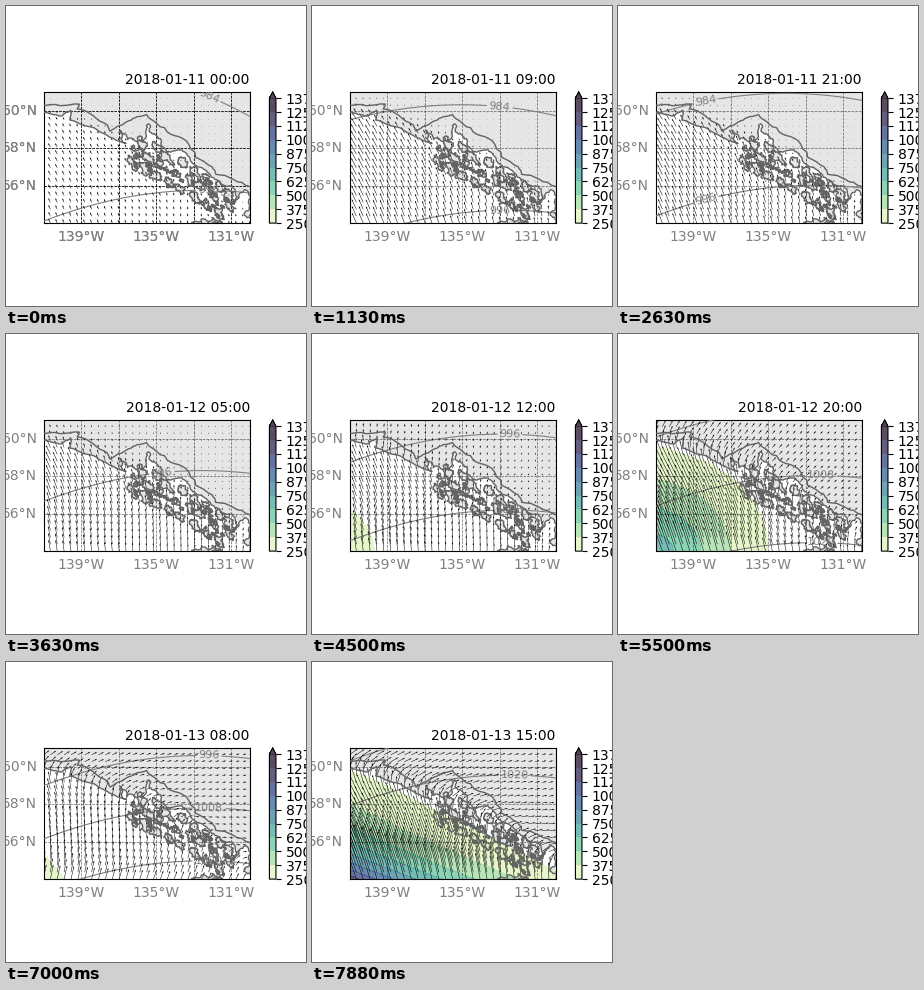
A matplotlib script that plays this animation: 300x300 px, repeating every 8 s.

```python
import numpy as np
import matplotlib.pyplot as plt
from matplotlib.animation import FuncAnimation
from matplotlib.colors import LinearSegmentedColormap

HOURS = 64
W, E, S, N = -141, -130, 54, 61
PX = 18.75                      # pixels per degree
X0, Y0 = 37.5, 85.875           # top left corner of the map in pixels
WIDE, HIGH = PX * (E - W), PX * (N - S)
LEVELS = np.arange(250, 1376, 125)
DEEP = LinearSegmentedColormap.from_list("deep", [
    "#fdfecc", "#c9ebb1", "#91d8a3", "#66c2a3", "#51a8a2", "#4a8da0",
    "#41729c", "#405494", "#413d6b", "#372946", "#281a2c"])
COAST = dict(color="0.39", lw=1, zorder=6)
rng = np.random.default_rng(11)


def lon(x):
    return W + (x - X0) / PX


def lat(y):
    return N - (y - Y0) / PX


def bump(k, mid, width):
    return np.exp(-0.5 * ((k - mid) / width) ** 2)


def ease(k, start, end):
    s = np.clip((k - start) / (end - start), 0, 1)
    return s * s * (3 - 2 * s)


def rough(pts, depth, amp):
    """Break every segment at a displaced midpoint, several times."""
    p = np.array(pts, float)
    for _ in range(depth):
        d = np.diff(p, axis=0)
        side = np.c_[-d[:, 1], d[:, 0]] * rng.normal(0, amp, (len(d), 1))
        out = np.empty((2 * len(p) - 1, 2))
        out[::2] = p
        out[1::2] = p[:-1] + d / 2 + side
        p = out
    return p


def land(shape):
    ax.fill(*shape.T, fc="0.9", ec="none", zorder=1)
    ax.plot(*shape.T, **COAST)


def island(mid, length, width, tilt):
    a = np.linspace(0, 2 * np.pi, 9)
    u, v = length * np.cos(a), width * np.sin(a)
    c, s = np.cos(tilt), np.sin(tilt)
    ring = np.c_[u * c - v * s, u * s + v * c] + mid
    land(rough(ring, 3, 0.28))


def flow(k, x, y):
    """Moisture transport: strength and heading at offsets from the SW corner."""
    shore = 110 - 0.2 * x - 0.0013 * x ** 2
    inland = 1 / (1 + np.exp((shore - y) / 6))
    progress = ease(k, 18, 60)
    base = (90 + 120 * min(k / 9, 1)) * np.exp(-x / 320)
    base = base * (1 - inland * (0.9 - 0.5 * progress))
    plume = 480 * bump(k, 45, 4.5) * np.exp(-np.hypot(x / 85, y / 70) ** 1.5)
    front = 1640 * bump(k, 67, 4) * np.exp(-x / 122 - y / 42)

    south = 114 - 36 * bump(k, 55, 4) - 18 * bump(k, 33, 6)
    deg = south + (124 - south) * y / HIGH - 14 * x / WIDE
    deg = deg - 95 * progress * inland
    return base + plume + front, np.radians(deg)


def isobar_height(p, k, x):
    """Pixel height of an isobar; the whole set climbs as pressure rises."""
    lead = np.interp(k, [0, 9, 21, 36, 44, 56, 63],
                     [188, 208, 183, 103, 78, 97, 28])
    mid = lead + (120 - 1.2 * k) * (p - 996) / 12
    tilt = -14 + 0.7 * max(0, 130 - mid) * np.exp(-k / 15)
    u = (x - 141) / 103
    return mid + tilt * u + 13 * u ** 2


fig = plt.figure(figsize=(3, 3), dpi=100, facecolor="white")
floor = (300 - Y0 - HIGH) / 300
ax = fig.add_axes([X0 / 300, floor, WIDE / 300, HIGH / 300])
ax.set(xlim=(W, E), ylim=(S, N), xticks=[], yticks=[], autoscale_on=False)

# Open coast, then the fjords down to the south-east
outer = rough([(-141.3, 59.95), (-140, 59.72), (-139.55, 60.02),
               (-139.6, 59.5), (-138.3, 59.08), (-137.5, 58.6),
               (-136.6, 58.25)], 3, 0.06)
fjords = rough([(-136.6, 58.25), (-136.9, 58.95), (-135.9, 58.4),
                (-135.4, 59.3), (-134.9, 58.5), (-133.6, 57.9),
                (-132.8, 57.0), (-131.9, 56.4), (-131.1, 56.0),
                (-130.9, 55.0), (-130.1, 55.7), (-130.3, 54.5),
                (-129.5, 54)], 4, 0.17)
land(np.vstack([outer, fjords, [(-129, 62), (-142, 62)]]))

# Archipelago: three rows of long islands with islets between
start, end = np.array([-136.0, 57.9]), np.array([-131.2, 55.1])
across = np.array([0.5, 0.86])
for row in (-0.6, 0, 0.5):
    for s in np.linspace(0, 1, 8):
        mid = start + s * (end - start) + row * across
        island(mid + rng.normal(0, 0.08, 2), rng.uniform(0.3, 0.5),
               rng.uniform(0.12, 0.22), -0.95 + rng.normal(0, 0.25))
for s in rng.random(30):
    mid = start + s * (end - start) + rng.uniform(-0.9, 0.6) * across
    island(mid, 0.12, 0.06, rng.uniform(-1.3, -0.4))
island((-132.3, 54.03), 0.8, 0.1, 0)

border = rough([(-141.1, 60.3), (-139.1, 60.35), (-139.2, 60.09),
                (-137.6, 59.24), (-137.45, 58.91), (-136.45, 59.46),
                (-135.5, 59.79), (-134.95, 59.3), (-133.4, 58.4),
                (-132.0, 57.0), (-131.8, 56.6), (-130, 55.95)], 3, 0.07)
ax.plot(*border.T, **COAST)


def graticule(alpha):
    """Dashed grid with its grey labels."""
    made = []
    dash = dict(color="black", lw=0.5, ls="--", alpha=alpha, zorder=4)
    for x in range(-139, -130, 2):
        made.append(ax.axvline(x, **dash))
        if x % 4 == 1:
            made.append(ax.annotate(
                f"{-x}°W", (x, S), (0, -5), textcoords="offset points",
                ha="center", va="top", color="gray"))
    for y in (56, 58, 60):
        made.append(ax.axhline(y, **dash))
        made.append(ax.annotate(
            f"{y}°N", (W, y), (-5, 0), textcoords="offset points",
            ha="right", va="center", color="gray"))
    return made


graticule(0.6)
first_only = graticule(1)

qx, qy = np.meshgrid(np.linspace(0, WIDE, 31), np.linspace(0, HIGH, 20))
cx, cy = np.meshgrid(np.linspace(0, WIDE, 84), np.linspace(0, HIGH, 54))


def shade(k):
    return ax.contourf(W + cx / PX, S + cy / PX, flow(k, cx, cy)[0], LEVELS,
                       cmap=DEEP, extend="max", alpha=0.8, zorder=2)


fills = [shade(HOURS - 1)]
cax = fig.add_axes([263.4 / 300, floor, 6.56 / 300, HIGH / 300])
fig.colorbar(fills[0], cax=cax, ticks=LEVELS)

arrows = ax.quiver(W + qx / PX, S + qy / PX, qx, qy, width=0.0024,
                   scale=18, scale_units="dots", zorder=5)
title = ax.set_title("", loc="right", fontsize=10)
xs = np.linspace(38, 244, 207)
isobars = {p: (ax.plot([], [], color="gray", lw=0.8, zorder=4)[0],
               ax.text(0, 0, str(p), color="gray", fontsize=8, ha="center",
                       va="center", clip_on=True, zorder=7))
           for p in range(984, 1021, 12)}


def draw_isobar(p, k):
    line, tag = isobars[p]
    ys = isobar_height(p, k, xs)
    tx = 203 - 115 * bump(k, 21, 6)
    ty = isobar_height(p, k, tx)
    slope = isobar_height(p, k, tx + 1) - ty
    inside = 89 < ty < 213
    tag.set(position=(lon(tx), lat(ty)), visible=inside,
            rotation=-np.degrees(np.arctan(slope)))
    if inside:
        gap = np.hypot(xs - tx, ys - ty) < 3.6 * len(str(p)) + 2
        ys = np.where(gap, np.nan, ys)
    line.set_data(lon(xs), lat(ys))


def draw(k):
    while fills:
        fills.pop().remove()
    if flow(k, cx, cy)[0].max() > LEVELS[0]:
        fills.append(shade(k))
    m, a = flow(k, qx, qy)
    arrows.set_UVC(m * np.cos(a), m * np.sin(a))
    for p in isobars:
        draw_isobar(p, k)
    for art in first_only:
        art.set_visible(k == 0)
    title.set_text(f"2018-01-{11 + k // 24} {k % 24:02d}:00")
    return []


anim = FuncAnimation(fig, draw, frames=HOURS, interval=125, repeat=True,
                     init_func=lambda: draw(0), blit=False)
plt.show()
```
